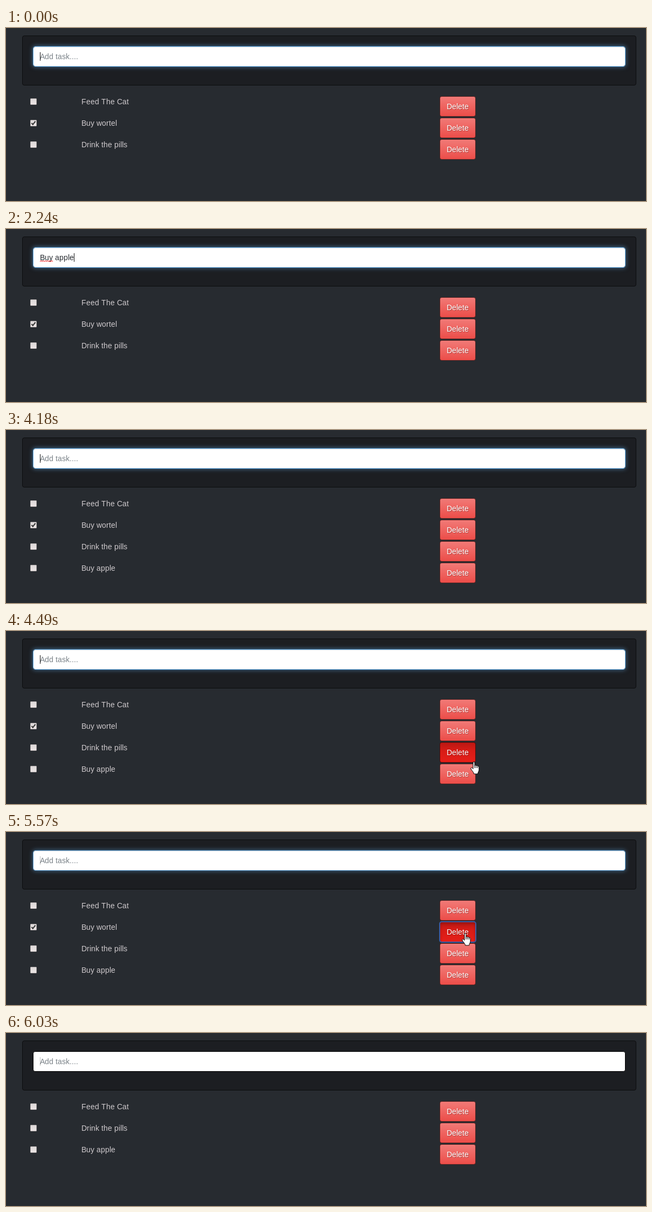
Write an HTML page that moves like this. It is 1188 px wide and 322 px high and loops after 7.29 s.

```html
<!DOCTYPE html>
<html lang="en">
<head>
<meta charset="utf-8">
<title>Task list</title>
<style>
  * { box-sizing: border-box; }
  html, body { margin: 0; width: 100%; height: 100%; overflow: hidden; }
  body {
    position: relative;
    background: #272b30;
    color: #cfcacd;
    font: 14px/20px "Liberation Sans", Arial, sans-serif;
    font-kerning: none;
    white-space: pre;
  }
  .panel, .input, .glow, .value, .caret, .wave, .cursor, .rows, .row > * { position: absolute; }
  .panel {
    left: 30px; top: 14px; width: 1140px; height: 93px;
    background: #1c1e22; border: 1px solid #0c0d0e; border-radius: 4px;
  }
  .input {
    left: 50px; top: 34px; width: 1100px; height: 38px;
    background: #fff; border: 1px solid #000; border-radius: 4px;
    box-shadow: inset 0 1px 1px rgba(0, 0, 0, .075);
  }
  .glow {
    inset: -1px;
    border: 1px solid #66afe9; border-radius: 4px;
    box-shadow: inset 0 1px 1px rgba(0, 0, 0, .075), 0 0 8px rgba(102, 175, 233, .6);
  }
  .value { left: 63px; top: 43px; color: #272b30; }
  .value.hint { color: #7a8288; }
  .caret { left: 63px; top: 45px; width: 1px; height: 16px; background: #111; }
  .wave { left: 63px; top: 58px; }
  .rows { left: 0; top: 127px; }
  .row { position: relative; height: 40px; }
  .box {
    left: 45px; top: 4px; width: 12px; height: 12px;
    border: 1px solid #b3adad; border-radius: 1px;
    background: linear-gradient(#dcd8d8, #ece5e5);
  }
  .box svg { position: absolute; left: -1px; top: -1px; }
  .name { left: 140px; top: 0; }
  .del {
    left: 805px; top: 0; height: 38px; padding: 8px 12px;
    color: #fff; text-shadow: 1px 1px 1px rgba(0, 0, 0, .3);
    border: 1px solid rgba(0, 0, 0, .6); border-radius: 4px;
    background: linear-gradient(#f17a77, #ee5f5b 60%, #ec4d49) no-repeat #ee5f5b;
  }
  .del.hover { background: linear-gradient(#bb1813, #d71c16 40%, #e61f19) no-repeat #d71c16; }
  .del.down { box-shadow: inset 0 3px 5px rgba(0, 0, 0, .2); }
  .del.ring { outline: 2px solid rgba(62, 104, 190, .85); outline-offset: -1px; }
  .cursor { left: 0; top: 0; overflow: visible; }
</style>
</head>
<body>
<div class="panel"></div>
<div class="input"><div class="glow"></div></div>
<div class="value"></div>
<svg class="wave" width="25" height="4" fill="none" stroke="#f00"><path/></svg>
<div class="caret"></div>
<div class="rows"></div>
<svg class="cursor" width="18" height="26" fill="#fff" stroke="#000" stroke-linejoin="round">
  <g class="hand">
    <path d="M5 2a1.5 1.5 0 0 1 3 0v6a1.4 1.4 0 0 1 2.8 .5a1.4 1.4 0 0 1 2.7 .8a1.4 1.4 0 0 1 2.5 1v5c0 3-2 4-2.3 7.7h-7.2c0-3-3-5-5.3-9a1.6 1.6 0 0 1 2.5-2l1.3 1.6z"/>
    <path fill="none" d="M8 8v4M10.8 8.8v3.2M13.5 9.6v2.4"/>
  </g>
  <path class="arrow" d="M.5 .5v16l3.7-3.6 2.3 5.4 2.4-1-2.3-5.2h5z"/>
</svg>
<script>
const LOOP = 7290;
const ADDED = 3170, PRESS = 5570, RELEASE = 5650, REMOVED = 5960;
const TASK = "Buy apple";
const KEYS = [360, 590, 840, 990, 1540, 1690, 1920, 2070, 2240];
const BLINK = [2790, ADDED, 3630, 4180, 4720, 5270, PRESS];
const FADE = [[0, 1], [PRESS, .9], [RELEASE, .4], [5730, .1], [5800, 0]];
// time, shape, left, top
const MOVES = [
  [0, ""],
  [4260, "arrow", 873, 311], [4330, "arrow", 874, 287], [4410, "arrow", 873, 263],
  [4490, "hand", 862, 243], [4570, "hand", 858, 232], [4640, "hand", 854, 222],
  [4720, "hand", 850, 214], [4800, "hand", 847, 208], [4870, "hand", 846, 203],
  [4950, "hand", 846, 196], [5020, "hand", 846, 191], [5100, "hand", 846, 188],
  [5730, "hand", 846, 200], [5800, "hand", 847, 213], [5900, "hand", 851, 249],
  [5960, "arrow", 858, 293], [6030, ""]
];

const $ = s => document.querySelector(s);
const pen = document.createElement("canvas").getContext("2d");
pen.font = '14px "Liberation Sans", Arial, sans-serif';
const advance = ch => pen.measureText(ch).width;
const textWidth = s => [...s].reduce((sum, ch) => sum + Math.round(advance(ch)), 0);

// Text with every advance snapped to whole pixels
function setText(el, s) {
  if (el.dataset.text === s) return;
  el.dataset.text = s;
  el.replaceChildren(...[...s].map(ch => {
    const span = document.createElement("span");
    span.textContent = ch;
    const w = advance(ch);
    span.style.letterSpacing = (Math.round(w) - w).toFixed(3) + "px";
    return span;
  }));
}

function addRow(name) {
  const row = document.createElement("div");
  row.className = "row";
  row.innerHTML = '<div class="box"></div><div class="name"></div><div class="del"></div>';
  setText(row.children[1], name);
  setText(row.children[2], "Delete");
  $(".rows").append(row);
  return row;
}

const rows = ["Feed The Cat", "Buy wortel", "Drink the pills", TASK].map(addRow);
const buttons = rows.map(r => r.children[2]);
rows[1].children[0].innerHTML =
  '<svg width="12" height="12" fill="none" stroke="#333" stroke-width="2"><path d="M2.5 6l2.4 2.7 4.6-6"/></svg>';
$(".wave path").setAttribute("d", "M0 2.5" + "l2-1.5 2 1.5".repeat(6));

const value = $(".value"), caret = $(".caret"), cursor = $(".cursor");
const show = (el, on) => { el.style.display = on ? "" : "none"; };
const at = (list, t) => list.filter(item => item[0] <= t).pop();
const passed = (times, t) => times.filter(x => x <= t).length;

function hovered(shape, x, y) {
  const top = y - 127;
  return shape === "hand" && x + 6 < 872 && top % 40 < 38 ? Math.floor(top / 40) : -1;
}

function draw(t) {
  const typed = t < ADDED ? TASK.slice(0, passed(KEYS, t)) : "";
  setText(value, typed || "Add task....");
  value.classList.toggle("hint", !typed);
  show($(".wave"), typed.length > 3);

  const lit = t < PRESS && passed(BLINK, t) % 2 === 0;
  caret.style.left = 63 + textWidth(typed) + "px";
  caret.style.opacity = lit ? 1 : .25;
  $(".glow").style.opacity = at(FADE, t)[1];

  show(rows[1], t < REMOVED);
  show(rows[3], t >= ADDED);

  const [, shape, x, y] = at(MOVES, t);
  show(cursor, shape);
  show($(".hand"), shape === "hand");
  show($(".arrow"), shape === "arrow");
  if (shape) cursor.style.transform = `translate(${x}px, ${y}px)`;

  const over = hovered(shape, x, y);
  buttons.forEach((b, i) => {
    b.classList.toggle("hover", i === over);
    b.classList.toggle("down", i === 1 && t >= PRESS && t < RELEASE);
    b.classList.toggle("ring", i === 1 && t >= PRESS);
  });
}

const start = performance.now();
function tick() {
  draw((performance.now() - start) % LOOP);
  requestAnimationFrame(tick);
}
tick();
</script>
</body>
</html>
```
